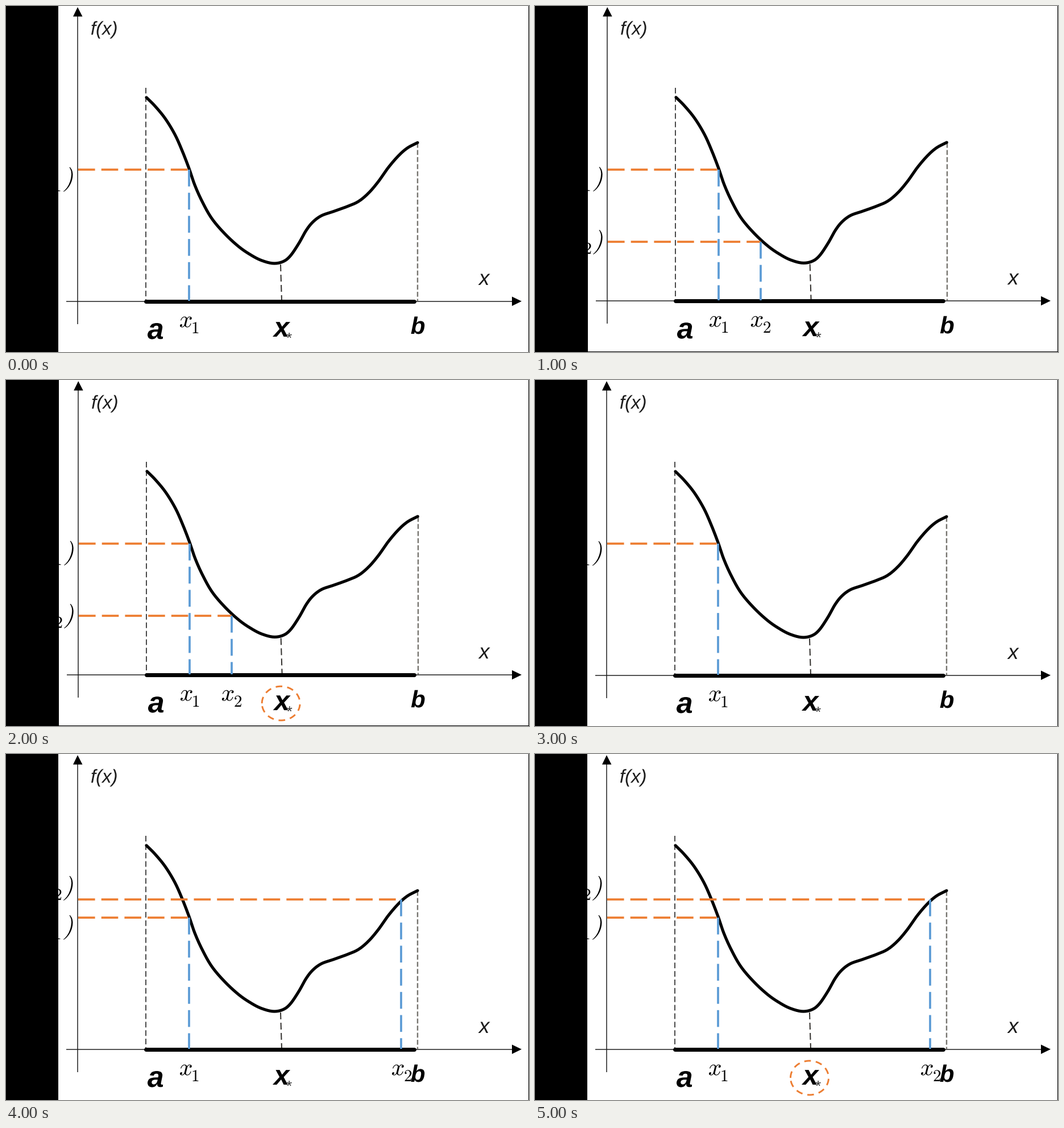
These frames come from a looping animation (920 by 609 pixels, 6 s). A matplotlib script:

```python
import numpy as np
import matplotlib.pyplot as plt
from matplotlib.animation import ArtistAnimation
from matplotlib.lines import Line2D
from matplotlib.patches import PathPatch, Polygon, Rectangle
from matplotlib.textpath import TextPath
from matplotlib.transforms import Affine2D

W, H, DPI = 920, 609, 64  # a power of two keeps the pixel size exact
PX = 72 / DPI
ORANGE, BLUE, INK = "#ED7D31", "#5B9BD5", "#1c1c1c"
LONG_DASH = (0, (8, 3))

plt.rcParams["mathtext.fontset"] = "cm"
fig = plt.figure(figsize=(W / DPI, H / DPI), dpi=DPI, facecolor="black")
ax = fig.add_axes([0, 0, 1, 1])
ax.set_xlim(0, W)
ax.set_ylim(H, 0)
ax.axis("off")

KNOTS = np.array([
    (247, 161), (262, 176), (280, 198), (297, 226), (310, 255), (322, 286),
    (332, 315), (345, 344), (362, 374), (385, 401), (410, 424), (432, 439),
    (450, 448), (470, 453), (487, 450), (500, 440), (515, 418), (528, 395),
    (540, 380), (555, 369), (575, 362), (600, 353), (620, 344), (638, 329),
    (655, 309), (672, 285), (690, 264), (706, 250), (724, 240.5)], float)


def spline(pts, steps=10):
    """Smooth curve through the points (Catmull-Rom)."""
    p = np.vstack([2 * pts[0] - pts[1], pts, 2 * pts[-1] - pts[-2]])
    t = np.linspace(0, 1, steps, endpoint=False)[:, None]
    parts = [
        0.5 * (2 * b + (c - a) * t + (2 * a - 5 * b + 4 * c - d) * t**2
               + (3 * b - a - 3 * c + d) * t**3)
        for a, b, c, d in zip(p, p[1:], p[2:], p[3:])]
    return np.vstack(parts + [pts[-1:]])


CURVE = spline(KNOTS)


class Scene:
    """Collects the artists of one picture."""

    def __init__(self, scale):
        # the drawing is scaled about its top right corner
        self.tr = (Affine2D().translate(-919, 0).scale(scale).translate(919, 0)
                   + ax.transData)
        self.items = []

    def add(self, artist, tr=None):
        artist.set_transform(tr or self.tr)
        ax.add_artist(artist)
        artist.set_zorder(len(self.items))
        self.items.append(artist)

    def box(self, x, y, w, h, color):
        self.add(Rectangle((x, y), w, h, fc=color, lw=0, antialiased=False),
                 ax.transData)

    def line(self, pts, width, color="black", dash="-", cap="butt"):
        x, y = np.transpose(pts)
        self.add(Line2D(x, y, lw=width * PX, color=color, ls=dash,
                        solid_capstyle=cap, solid_joinstyle="round",
                        dash_capstyle="butt"))

    def poly(self, pts):
        self.add(Polygon(pts, fc="black", lw=0))

    def text(self, s, x, y, size, weight="normal", color="black", slant=0):
        """Text with its ink starting at x and its baseline at y."""
        prop = dict(family="Liberation Sans", style="italic", weight=weight)
        path = TextPath((0, 0), s, size=size, prop=prop)
        path = path.transformed(
            Affine2D().skew(np.arctan(slant), 0).scale(1, -1))
        left = path.get_extents().x0
        path = path.transformed(Affine2D().translate(x - left, y))
        self.add(PathPatch(path, fc=color, lw=0))

    def sub(self, n, x, y):
        self.text(rf"$\mathit{{{n}}}$", x, y, 29.5)

    def graph(self):
        self.line([(126, 12), (126, 560)], 1.5, INK)
        self.poly([(126, 2), (118, 18.5), (134.5, 18.5)])
        self.line([(106, 519.7), (892, 519.7)], 1.5, INK)
        self.poly([(907, 519.7), (890, 511.5), (890, 528)])
        self.line([(246, 144), (246, 519)], 1.6, INK, (0, (6.2, 3.1)))
        self.line([(724.3, 241), (724.3, 519)], 2.4, "#77756f", (0, (3.6, 1.6)))
        self.line([(483, 455), (485, 519)], 2, "#33312e", (0, (6, 3)))
        self.line([(246, 519.7), (717.5, 519.7)], 7, cap="round")
        self.line(CURVE, 5.2, cap="round")
        self.text("f(x)", 150, 50.5, 33, color=INK)
        self.text("x", 830.5, 491, 37, color=INK)
        self.text("a", 249, 586, 52, "bold")
        self.text("x", 469, 582, 49, "bold")
        self.text("*", 493.5, 593, 26, color="#333333")
        self.text("b", 712.5, 577, 42, "bold")

    def probe(self, n, x, y, label_x, value_y):
        """Dashed projections of a point on the curve, with their labels."""
        self.line([(126.5, y), (x, y)], 3.7, ORANGE, LONG_DASH)
        self.line([(x, y), (x, 518.5)], 3.7, BLUE, LONG_DASH)
        self.text("$x$", label_x, 565.5, 42)
        self.sub(n, label_x + 22.5, 576)
        self.sub(n, 85.5, value_y + 10)
        self.text("$)$", 101, value_y, 43, slant=0.25)

    def ring(self):
        t = np.linspace(0, 2 * np.pi, 121)
        pts = np.c_[483 - 33.5 * np.cos(t), 570 - 30 * np.sin(t)]
        self.line(pts, 2.9, ORANGE, (0, (4, 3)))


def build(i):
    step, right = i % 3, i >= 3
    narrow = step > 0 and not right
    s = Scene(0.9985 if narrow else 1)
    left, bottom = (93, 608) if narrow else (92, 609)
    s.box(0, 0, W, H, "black")
    s.box(left, 0, 919 - left, bottom, "white")
    s.graph()
    s.probe(1, 322, 288.3, 306, 316)
    if step:
        if right:
            s.probe(2, 695, 256, 679, 247)
        else:
            s.probe(2, 396, 415.3, 379, 427)
    if step == 2:
        s.ring()
    return s.items


anim = ArtistAnimation(fig, [build(i) for i in range(6)], interval=1000,
                       repeat=True, repeat_delay=0)
plt.show()
```
